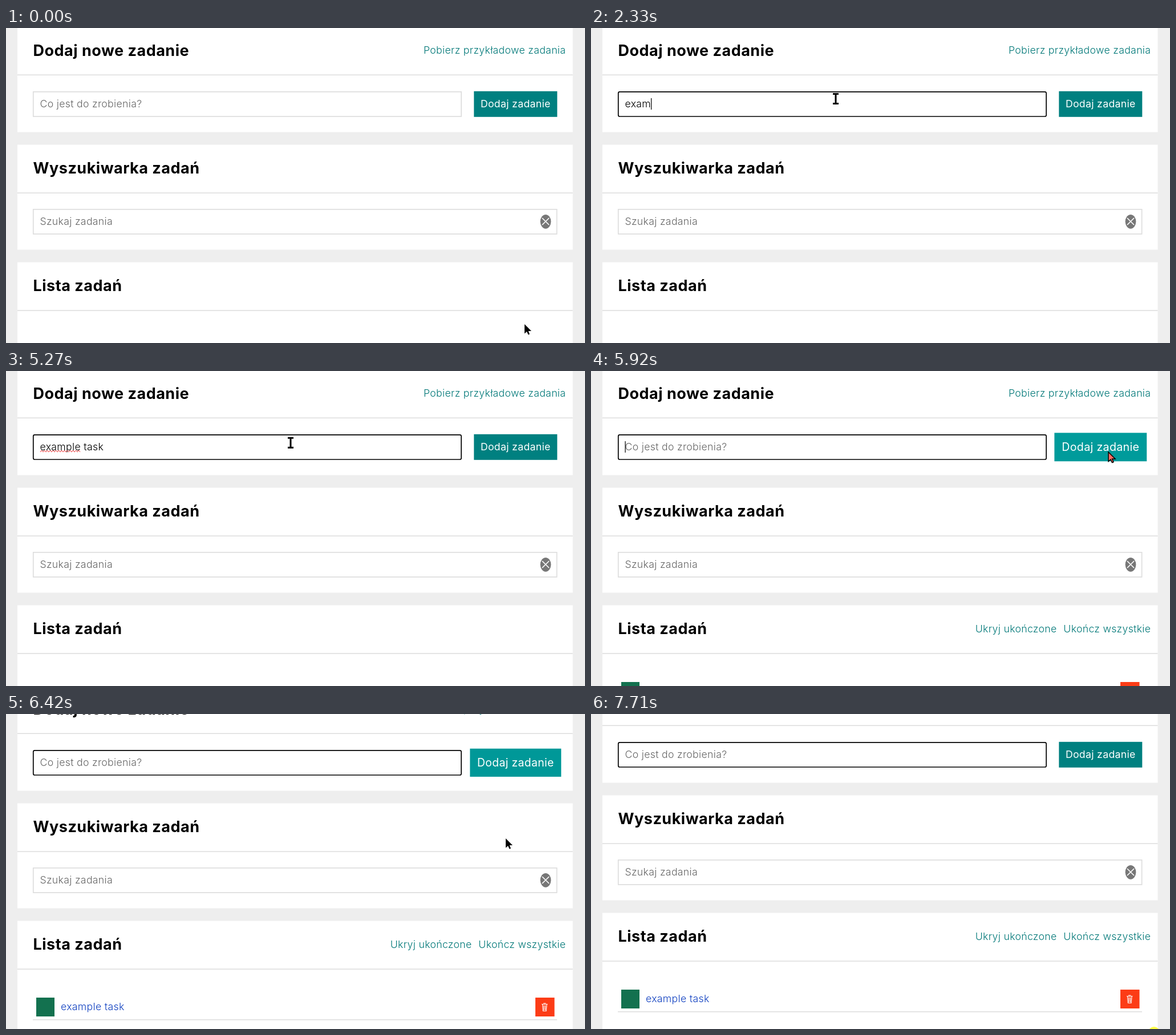
Recreate the animation shown at these times as an HTML page. Size 1015 by 552 pixels, loop 7800 ms.

```html
<!DOCTYPE html>
<html lang="pl">
<head>
<meta charset="utf-8">
<title>Lista zadań</title>
<style>
  html, body { margin: 0; width: 100%; height: 100%; overflow: hidden; background: #eee; }
  svg { display: block; width: 100%; height: 100%; }
  text { font: 300 17.7px Inter, "Open Sans", sans-serif; letter-spacing: .3px; white-space: pre; }
  .title { font-weight: 700; font-size: 27px; letter-spacing: .5px; }
  .hint { fill: #666; }
  .link { fill: #007878; text-anchor: end; }
  .card { fill: #fff; }
  .rule { fill: #ddd; }
  .box { fill: #fff; stroke: #ddd; stroke-width: 1.7; }
</style>
</head>
<body>
<svg viewBox="0 0 1015 552">
  <g id="page">
    <rect class="card" x="20" y="-40" width="973.5" height="222.5"/>
    <rect class="card" x="20" y="204.5" width="973.5" height="184"/>
    <rect class="card" x="20" y="410.5" width="973.5" height="230"/>
    <rect class="rule" x="20" y="81.5" width="973.5" height="1.5"/>
    <rect class="rule" x="20" y="288.3" width="973.5" height="1.5"/>
    <rect class="rule" x="20" y="494.3" width="973.5" height="1.5"/>

    <text class="title" x="47.5" y="49">Dodaj nowe zadanie</text>
    <text class="title" x="47.5" y="255">Wyszukiwarka zadań</text>
    <text class="title" x="47.5" y="461">Lista zadań</text>
    <text class="link" x="981.3" y="45">Pobierz przykładowe zadania</text>

    <rect class="box" id="field" x="47.8" y="111.8" width="750.3" height="43.2"/>
    <text class="hint" id="hint" x="59.5" y="139">Co jest do zrobienia?</text>
    <text id="typed" x="59.5" y="139"></text>
    <path id="squiggle" fill="none" stroke="#e33"/>
    <rect id="caret" y="123" width="1.2" height="20"/>

    <g id="button">
      <rect x="-73" y="-22.5" width="146" height="45"/>
      <text y="5.7" text-anchor="middle" fill="#fff" style="font-weight:400">Dodaj zadanie</text>
    </g>

    <rect class="box" x="47.8" y="317.8" width="917.8" height="43.2"/>
    <text class="hint" x="59.5" y="345">Szukaj zadania</text>
    <ellipse cx="946" cy="339.3" rx="9.4" ry="12.4" fill="#777"/>
    <path d="M940 333l12 12m0-12l-12 12" stroke="#fff" stroke-width="1.6"/>

    <g id="task">
      <text class="link" x="816.5" y="458">Ukryj ukończone</text>
      <text class="link" x="981.3" y="458">Ukończ wszystkie</text>
      <rect x="53" y="545" width="32" height="33" fill="#13714f"/>
      <text x="96" y="567" fill="#1040c0">example task</text>
      <rect x="928" y="545" width="33.5" height="33" fill="#fc3c16"/>
      <path d="M939 556.5h10.5M942 555h4.5M940.5 557l1 11.5h5.5l1-11.5M943 558.5v8.5M945.5 558.5v8.5"
            fill="none" stroke="#fff" stroke-width="1.2"/>
      <rect class="rule" x="47" y="583" width="919" height="1.5"/>
    </g>
  </g>

  <path id="arrow" d="M0 0V16.5L4 13L6.5 18.5L9 17.5L6.7 12H12Z"/>
  <path id="beam" d="M-5 -8.5H5M-5 8.5H5M0 -8.5V8.5" fill="none" stroke="#000" stroke-width="3"/>
  <circle id="spot" cx="987" cy="558" r="10" fill="#ffff46"/>
</svg>
<script>
const LOOP = 7800, FOCUS = 580, ADD = 5870, HOVER = 5605, LEAVE = 6185;
const WORD = "example task";
const KEYS = [1580, 1910, 2080, 2330, 2410, 2580, 2910, 3430, 3680, 3860, 4030, 4280];
const PATH = [
  [60, 909, 519], [80, 572, 205], [160, 446, 112], [300, 446, 112], [410, 429, 124],
  [5200, 429, 124], [5605, 828, 134], [5800, 907, 142], [6080, 907, 142],
  [6185, 892, 160], [6330, 876, 218], [6820, 876, 218], [7000, 903, 320], [7380, 987, 560]
];

const el = id => document.getElementById(id);
const set = (id, attrs) => {
  for (const k in attrs) el(id).setAttribute(k, attrs[k]);
};
const show = (id, on) => set(id, { visibility: on ? "visible" : "hidden" });
const clamp = v => Math.max(0, Math.min(1, v));
const smooth = u => u * u * (3 - 2 * u);

// CSS "ease": cubic-bezier(.25, .1, .25, 1)
function ease(x) {
  if (x <= 0 || x >= 1) return clamp(x);
  const bez = (a, b, u) => 3 * a * u * (1 - u) ** 2 + 3 * b * u * u * (1 - u) + u ** 3;
  let lo = 0, hi = 1;
  for (let i = 0; i < 24; i++) {
    const mid = (lo + hi) / 2;
    if (bez(.25, .25, mid) < x) lo = mid; else hi = mid;
  }
  return bez(.1, 1, lo);
}

function pointer(t) {
  const i = PATH.findIndex(p => p[0] > t);
  if (i === 0) return PATH[0].slice(1);
  if (i < 0) return PATH.at(-1).slice(1);
  const [t0, x0, y0] = PATH[i - 1], [t1, x1, y1] = PATH[i];
  const u = (t - t0) / (t1 - t0);
  return [x0 + (x1 - x0) * u, y0 + (y1 - y0) * u];
}

// One-second hover transition, reversed part-way
function hover(t) {
  if (t < LEAVE) return ease((t - HOVER) / 1000);
  const peak = ease((LEAVE - HOVER) / 1000);
  return peak * (1 - ease((t - LEAVE) / 1000 / peak));
}

function squiggle(from, to) {
  let d = `M${from} 142`;
  for (let x = from, up = true; x + 2.5 <= to; x += 2.5, up = !up) d += `l2.5 ${up ? -3 : 3}`;
  return d;
}

function draw(t) {
  const added = t >= ADD, focused = t >= FOCUS;
  const count = added ? 0 : KEYS.filter(k => k <= t).length;

  const scroll = Math.round(62 * smooth(clamp((t - 6270) / 220)));
  set("page", { transform: `translate(0 ${-scroll})` });
  set("field", focused ? { style: "stroke:#000", rx: 2.5 } : { style: "", rx: 0 });
  show("hint", !count);
  show("task", added);

  el("typed").textContent = WORD.slice(0, count);
  const width = count ? el("typed").getComputedTextLength() : 0;
  show("squiggle", count > 7);
  if (count > 7) set("squiggle", { d: squiggle(60, 59.5 + el("typed").getSubStringLength(0, 7)) });

  // The caret blinks every half second since the last edit
  const since = added ? ADD + 10 : count ? KEYS[count - 1] : FOCUS;
  const idle = count || added ? t - since : Math.min(t - since, 999);
  show("caret", focused && Math.floor(Math.max(0, idle) / 500) % 2 === 0);
  set("caret", { x: 59.5 + width });

  const h = hover(t), tone = 128 + 50 * h;
  set("button", { transform: `translate(893.3 133.3) scale(${1 + .2 * h})`, fill: `rgb(0 ${tone} ${tone})` });

  const [x, y] = pointer(t);
  const inField = x > 47 && x < 799 && y > 111 && y < 156;
  const pressed = t >= ADD && t < 6000;
  show("beam", inField);
  show("arrow", !inField);
  set(inField ? "beam" : "arrow", { transform: `translate(${x} ${y})` });
  set("arrow", pressed
    ? { fill: "#ff6b62", stroke: "#000", "stroke-width": 1.5 }
    : { fill: "#000", stroke: "none" });
  show("spot", t >= 7710);
}

const start = performance.now();
function tick() {
  draw((performance.now() - start) % LOOP);
  requestAnimationFrame(tick);
}
tick();
</script>
</body>
</html>
```
